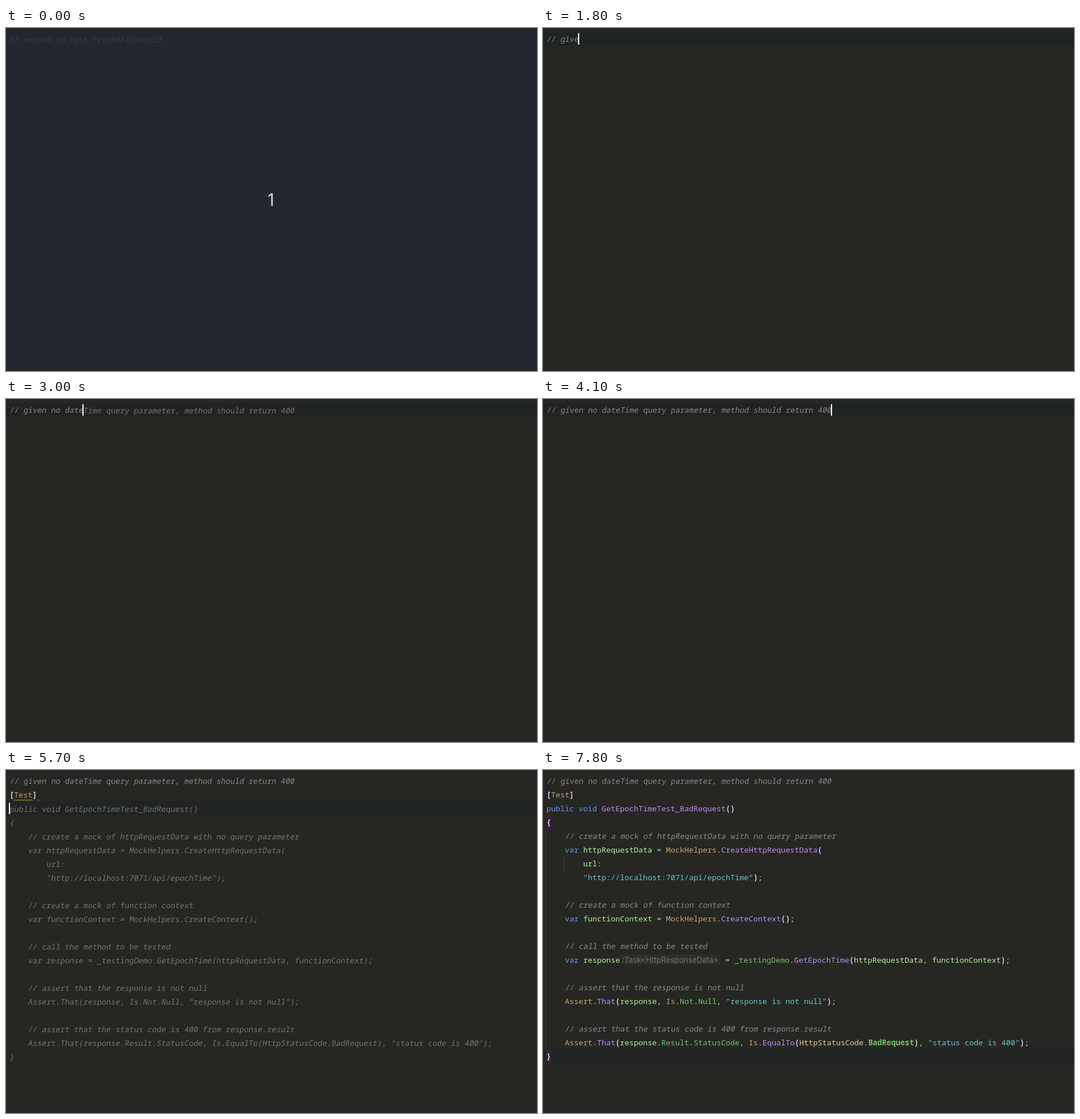
Recreate the animation shown at these times as an HTML page. Size 924 px wide and 598 px high, loop 8700 ms.

```html
<!DOCTYPE html>
<html lang="en">
<head>
<meta charset="utf-8">
<title>Typing a unit test</title>
<style>
html, body { margin: 0; width: 100%; height: 100%; overflow: hidden; background: #262722; }
#stage { position: relative; width: 924px; height: 598px; overflow: hidden; background: #262722;
  font: 13.3333px/24px "Noto Sans Mono", "DejaVu Sans Mono", monospace; color: #cdcdcd; }
#stage div, svg { position: absolute; }
.line { left: 6px; height: 24px; white-space: pre; }
.c, .ghost { display: inline-block; transform: skewX(-9deg); transform-origin: 0 70%; color: #878787; }
.ghost { position: relative; top: 1px; color: #727272; }
.k, .v { color: #6c95eb; }
.s { color: #66c3cc; }
.a, .t { color: #c9a26d; }
.m { color: #b98cf6; }
.l { color: #b4f09a; }
.p { color: #72c268; }
.h { color: #e6cb9c; }
.e { color: #72c268; font-weight: 700; }
b, .q { font-weight: 600; }
.q { display: inline-block; height: 24px; vertical-align: top; }
.plain :is(.v, .t, .m, .l, .p, .h, .e) { color: inherit; font-weight: inherit; }
.n { display: none; width: 175px; height: 24px; vertical-align: top; text-align: center; position: relative;
  font: 13.3px/24px Inter, "Open Sans", sans-serif; color: #6f706c; }
.n::before { content: ""; position: absolute; z-index: -1; inset: 3px 0 4px 1px; border-radius: 4px; background: #2e2f2b; }
.hints .n { display: inline-block; z-index: 0; }
.attr #l1 .q, .hints :is(#l3, #l20) .q { background: #3f1f42; color: #e3bfe2; }
.guide { width: 1px; visibility: hidden; }
.hints .guide { visibility: visible; }
#row { left: 0; width: 924px; height: 24px; background: #202423; }
#caret { width: 2px; height: 20px; background: #fff; }
#foot { left: 0; top: 594px; width: 924px; height: 4px; background: #2a2624; }
#veil { inset: 0; background: #252833; }
#count { inset: 0; font: 30px/598px "Noto Sans", "Open Sans", sans-serif; text-align: center; color: #d0e2f0; }
</style>
</head>
<body>
<div id="stage">
  <div id="row"></div>
  <div class="guide" style="left:4px;top:103px;height:384px;background:#52304f"></div>
  <div class="guide" style="left:36px;top:151px;height:24px;background:#484944"></div>
  <div id="text"></div>
  <svg id="waves" width="80" height="60" style="left:0;top:0" fill="none"></svg>
  <div id="caret"></div>
  <div id="foot"></div>
  <div id="veil"></div>
  <div id="count">1</div>
</div>
<script>
const $ = id => document.getElementById(id);
const LOOP = 8700;
const comment = "// given no dateTime query parameter, method should return 400";

// `x…` wraps a token of class x
const code = [
  "`c" + comment + "`",
  "`q[``aTest``q]`",
  "`kpublic` `kvoid` `mGetEpochTimeTest_BadRequest`()",
  "`q{`",
  "    `c// create a mock of httpRequestData with no query parameter`",
  "    `vvar` `lhttpRequestData` = `tMockHelpers`.`mCreateHttpRequestData`(",
  "        `lurl`:",
  '        `s"http://localhost:7071/api/epochTime"`);',
  "",
  "    `c// create a mock of function context`",
  "    `vvar` `lfunctionContext` = `tMockHelpers`.`mCreateContext`();",
  "",
  "    `c// call the method to be tested`",
  "    `vvar` `lresponse``n:Task<HttpResponseData>` = `p_testingDemo`.`mGetEpochTime`(`lhttpRequestData`, `lfunctionContext`);",
  "",
  "    `c// assert that the response is not null`",
  '    `tAssert`.`mThat`(`lresponse`, `tIs`.`pNot`.`pNull`, `s"response is not null"`);',
  "",
  "    `c// assert that the status code is 400 from response.result`",
  '    `tAssert`.`mThat`(`lresponse`.`pResult`.`pStatusCode`, `tIs`.`mEqualTo`(`hHttpStatusCode`.`eBadRequest`), `s"status code is 400"`);',
  "`q}`"
];

const esc = s => s.replace(/</g, "&lt;");
const span = (cls, s) => `<span class="${cls}">${esc(s)}</span>`;
const markup = src => src.split("`").map((part, i) =>
  i % 2 ? span(part[0], part.slice(1)) : part.replace(/[()]+/g, "<b>$&</b>")).join("");
const bare = src => src.split("`").map((part, i) =>
  i % 2 ? (part[0] === "n" ? "" : part.slice(1)) : part).join("");

const lines = code.map((_, i) => {
  const el = document.createElement("div");
  el.className = "line";
  el.id = "l" + i;
  el.style.top = 7 + 24 * i + "px";
  return $("text").appendChild(el);
});

const wave = (x0, x1, color) => {
  let d = "";
  for (let x = x0, i = 0; x <= x1; x += 2, i++) d += `${i ? "L" : "M"}${x} ${i % 2 ? 51.5 : 53.5}`;
  return `<path d="${d}" stroke="${color}"/>`;
};
$("waves").innerHTML = wave(14, 46, "#c0b440") + wave(54, 61, "#c8474d");

const PLAIN = 1, ATTR = 2, WAVES = 4, HINTS = 8;
const all = code.length;
const hello = " method to test PrintHelloWorld";

// time, typed characters, ghost, caret line, caret column (-1 hides it), finished lines, flags
const steps = [
  [0, 2, hello, 0, -1, 0, 0],
  [600, 2, hello, 0, 2, 0, 0],
  [800, 2, "", 0, 2, 0, 0],
  [1200, 3, "", 0, 3, 0, 0],
  [1300, 3, hello.slice(1), 0, 3, 0, 0],
  [1500, 4, "", 0, 4, 0, 0],
  [1600, 5, "", 0, 5, 0, 0],
  [1700, 6, "", 0, 6, 0, 0],
  [1800, 7, "", 0, 7, 0, 0],
  [1900, 8, "", 0, 8, 0, 0],
  [2100, 10, "", 0, 10, 0, 0],
  [2200, 11, "", 0, 11, 0, 0],
  [2300, 11, " parameters, should return null", 0, 11, 0, 0],
  [2500, 12, "", 0, 12, 0, 0],
  [2600, 12, "query parameters, method should return a 400 response", 0, 12, 0, 0],
  [2700, 13, "", 0, 13, 0, 0],
  [2800, 14, "", 0, 14, 0, 0],
  [3000, 16, comment.slice(16), 0, 16, 0, 0],
  [4100, 62, "", 0, 62, 1, 0],
  [4400, 62, "", 1, 0, 1, 0],
  [4500, 62, "[Test]", 1, 0, 1, 0],
  [5200, 62, "", 1, 6, 2, ATTR],
  [5300, 62, "", 1, 6, 2, ATTR | WAVES],
  [5700, 62, "*", 2, 0, 2, WAVES],
  [6400, 62, "", 20, 1, all, PLAIN | WAVES],
  [6500, 62, "", 20, 1, all, WAVES],
  [6600, 62, "", 20, 1, all, HINTS],
  [7800, 62, "", 20, -1, all, HINTS]
];

function show([, typed, ghost, row, col, done, flags]) {
  lines.forEach((el, i) => {
    let html = "";
    if (i < done) html = markup(code[i]);
    else if (ghost === "*") html = span("ghost", bare(code[i]));
    else if (i === 0) html = span("c", comment.slice(0, typed)) + span("ghost", ghost);
    else if (i === row) html = span("ghost", ghost);
    el.innerHTML = html;
  });
  const cls = $("stage").classList;
  cls.toggle("plain", !!(flags & PLAIN));
  cls.toggle("attr", !!(flags & ATTR));
  cls.toggle("hints", !!(flags & HINTS));
  $("waves").style.visibility = flags & WAVES ? "visible" : "hidden";
  $("row").style.top = 7 + 24 * row + "px";
  const caret = $("caret").style;
  caret.visibility = col < 0 ? "hidden" : "visible";
  caret.left = 5 + 8 * col + "px";
  caret.top = 9 + 24 * row + "px";
}

let current;
function tick() {
  const t = performance.now() % LOOP;
  const step = steps.findLast(s => s[0] <= t);
  if (step !== current) show(current = step);
  const fade = Math.max(0, 1 - Math.floor(t / 100) / 4);
  $("veil").style.opacity = 0.76 * fade;
  $("count").style.opacity = fade;
  requestAnimationFrame(tick);
}
tick();
</script>
</body>
</html>
```
